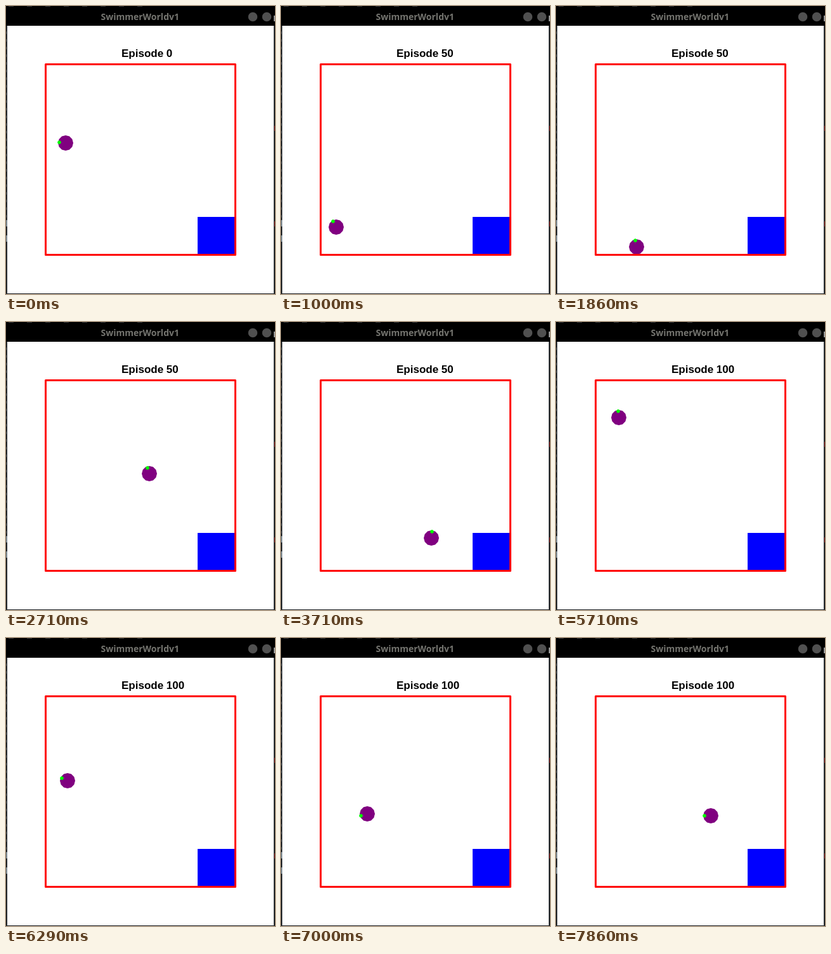
Write an HTML page with a canvas that moves like this. It is 424x452 px and loops after 8 s.

```html
<!DOCTYPE html>
<html lang="en">
<head>
<meta charset="utf-8">
<title>SwimmerWorldv1</title>
<style>
html, body { margin: 0; width: 100%; height: 100%; overflow: hidden; background: #fff; }
canvas { display: block; }
</style>
</head>
<body>
<canvas id="stage" width="424" height="452"></canvas>
<script>
const ctx = document.getElementById('stage').getContext('2d');
const LOOP = 8000, STEPS = 56, STEPS_PER_SECOND = 7;
const BALL = 12, TAIL = 10, FLOOR = 383;

const pose = (step, x, y, angle) => ({ step, x, y, angle });

// Each run drifts on a line or parabola through its poses; angle points to the tail.
const runs = [
  { start: 0, episode: 0, poses: [pose(0, 94, 215, 186), pose(2, 64, 234, 191)] },
  { start: 3, episode: 50, poses: [pose(3, 65, 260, 245), pose(8, 93, 360, 241), pose(13, 127, 378, 256)] },
  { start: 14, episode: 50, poses: [pose(14, 239, 174, 281), pose(20, 225, 252, 250), pose(26, 237, 339, 276)] },
  { start: 29, episode: 100, poses: [pose(30, 162, 332, 174), pose(34, 231, 341, 169)] },
  { start: 39, episode: 100, poses: [pose(40, 99, 150, 264), pose(49, 136, 276, 165), pose(55, 244, 279, 180)] },
];

// Lagrange polynomial through one property of the poses.
function along(poses, step, key) {
  return poses.reduce((sum, p) => sum + poses.reduce((term, q) =>
    q === p ? term : term * (step - q.step) / (p.step - q.step), p[key]), 0);
}

function box(color, x, y, w, h) {
  ctx.fillStyle = color;
  ctx.fillRect(x, y, w, h);
}

function polygon(color, x, y, r, sides) {
  ctx.fillStyle = color;
  ctx.beginPath();
  for (let i = 0; i < sides; i++) {
    const a = 2 * Math.PI * i / sides;
    ctx.lineTo(x + r * Math.cos(a), y + r * Math.sin(a));
  }
  ctx.fill();
}

function text(str, x, y, font, color) {
  ctx.font = font;
  ctx.fillStyle = color;
  ctx.fillText(str, x, y);
}

function drawWindow() {
  box('#202428', 0, 0, 424, 452);
  for (let y = 40; y < 330; y += 12) box('#505458', 0, y, 1, 4);
  for (const y of [336, 360]) box('#78848c', 0, y, 2, 10);
  for (const y of [188, 338]) box('#a02828', 423, y, 1, 8);
  box('#000', 0, 0, 424, 31);
  for (let x = 4; x < 210; x += 29) box('#383838', x, 0, 8, 1);
  box('#999', 422, 15, 2, 9);
  box('#fff', 2, 31, 420, 420);
  text('SwimmerWorldv1', 149.5, 22, 'bold 14px "Open Sans", "Noto Sans", sans-serif', '#74746f');
  for (const x of [389, 411]) polygon('#505050', x, 17, 7.2, 40);
}

function drawSwimmer(poses, step) {
  const x = Math.round(along(poses, step, 'x'));
  const y = Math.round(Math.min(FLOOR, along(poses, step, 'y')));
  const a = along(poses, step, 'angle') * Math.PI / 180;
  polygon('#800080', x, y, BALL, 12);
  polygon('#0f0', Math.round(x + TAIL * Math.cos(a)), Math.round(y + TAIL * Math.sin(a)), 3, 8);
}

function draw(step) {
  const run = runs.findLast(r => step >= r.start);
  drawWindow();
  text('Episode ' + run.episode, 182, 80, 'bold 17px "Liberation Sans", Arial, sans-serif', '#000');
  drawSwimmer(run.poses, step);
  box('#00f', 302, 331, 59, 59);
  ctx.strokeStyle = '#f00';
  ctx.lineWidth = 3;
  ctx.lineJoin = 'round';
  ctx.strokeRect(62.5, 91.5, 299, 299);
}

function tick() {
  const t = performance.now() % LOOP;
  draw(Math.min(STEPS - 1, Math.floor((t + 5) * STEPS_PER_SECOND / 1000)));
  requestAnimationFrame(tick);
}
tick();
</script>
</body>
</html>
```
